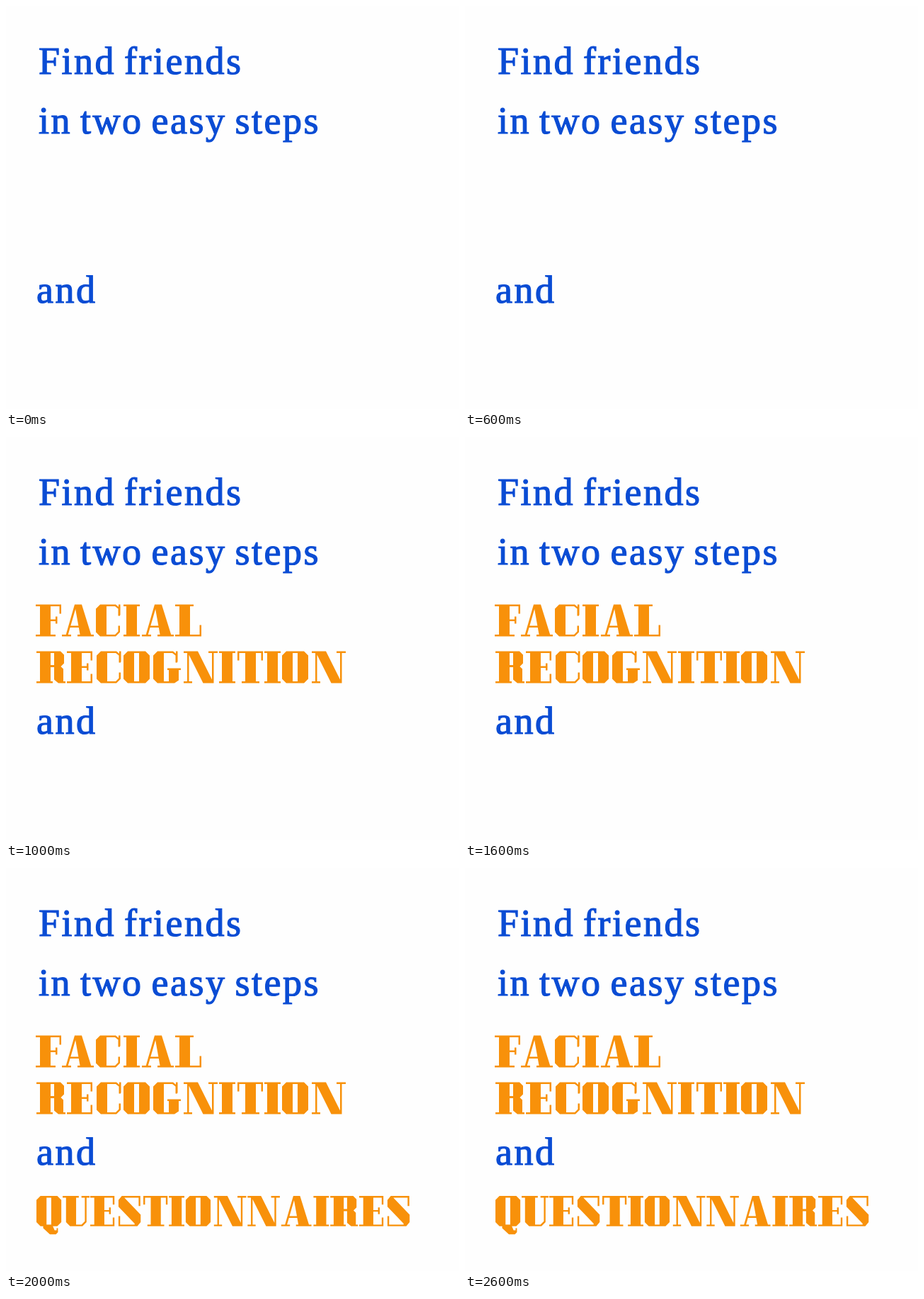
An HTML page for the animation above (3000 ms loop, 640 by 569 pixels).

```html
<!DOCTYPE html>
<html lang="en">
<head>
<meta charset="utf-8">
<title>Find friends in two easy steps</title>
<style>
  html, body { margin: 0; height: 100%; overflow: hidden; background: #fefefe; }
  svg { display: block; width: 640px; height: 569px; }
  text {
    font: 54px "Liberation Serif", serif;
    letter-spacing: 2.5px; word-spacing: -4px;
    fill: #0a4cd4; stroke: #0a4cd4; stroke-width: 1.2px;
  }
  g { fill: #f8910a; }
</style>
</head>
<body>
<svg viewBox="0 0 640 569">
  <text x="46" y="96">Find friends</text>
  <text x="46" y="180">in two easy steps</text>
  <text x="43" y="419">and</text>
  <g id="first"></g>
  <g id="second"></g>
</svg>
<script>
const LOOP = 3000, STEP = 1000;
const first = document.getElementById("first");
const second = document.getElementById("second");

// Slab lettering, 45 units high, built from heavy stems and hairlines.
const rect = (x, y, w, h) => `M${x} ${y}h${w}v${h}h${-w}z`;
const stem = x => rect(x, 0, 15, 45);
const bar = (x, y, w) => rect(x, y, w, 2.5);
const tick = (x, y, h) => rect(x, y, 2.5, h);
const head = (w, x = 0) => bar(x, 0, w);
const foot = (w, x = 0) => bar(x, 42.5, w);

const armed = stem(6) + head(36) + tick(33.5, 0, 13) + bar(21, 21, 8) + tick(28, 17, 10);
const ring = "M6 0h25l6 6v33l-6 6h-25l-6-6v-33zM15 2.5v40h7v-40z";
const curve = "M7 0h9v45h-9l-6-6v-33z" + "M16 0h13l6 5v11h-2.5v-10l-4.5-3.5h-12z" + tick(33, 0, 15);

// Each letter: [advance, outline]
const letters = {
  A: [48, "M19 0h3L9 45h-3zM19 0h10l14 45h-16z" + bar(12, 30, 14) + foot(13, 1) + foot(23, 23)],
  C: [39, curve + "M16 45h13l6-6v-9h-2.5v8l-4.5 4.5h-12z"],
  E: [41, armed + foot(36) + tick(33.5, 32, 13)],
  F: [36, armed + foot(28)],
  G: [43, curve + bar(21, 24, 19) + "M23 24h14v17l-6 4H16v-2.5h7z"],
  I: [26, stem(5) + head(23, 1) + foot(23, 1)],
  L: [38, stem(6) + head(26) + foot(37) + tick(34.5, 29, 16)],
  N: [50, "M6 0h15l22.5 45h-15z" + tick(6, 0, 45) + tick(41, 0, 45) + head(18, 1) + head(13, 36) + foot(12, 1)],
  O: [41, ring],
  Q: [39, ring + "M10 44h14l3 7h3v-3h2v6l-3 3h-9l-10-9z"],
  R: [43, stem(5) + head(20) + foot(23) +
    "M20 0h14l5 5v12l-5 5h-14v-2.5h5v-17h-5zM20 20h13l5 5v17.5h3v2.5h-10l-6-5v-17.5h-5z"],
  S: [37, "M1 6l5-6h4v3l24 25v11l-5 6h-4v-4L1 16z" + head(24, 9) + foot(24, 2) + tick(31, 0, 15) + tick(1, 30, 15)],
  T: [38, stem(12) + head(36, 1) + tick(1, 0, 13) + tick(34.5, 0, 13) + foot(25, 7)],
  U: [41, "M5 0h15v45h-9l-6-6z" + head(24) + head(12, 28) + "M20 42.5h8l5-5V0h2.5v39l-6 6h-9.5z"],
};

function letterLine(group, word, x, y, scale = 1) {
  let pen = 0, paths = "";
  for (const ch of word) {
    const [advance, outline] = letters[ch];
    paths += `<path transform="translate(${pen})" d="${outline}"/>`;
    pen += advance;
  }
  group.innerHTML +=
    `<g role="img" aria-label="${word}" transform="translate(${x} ${y}) scale(${scale})">${paths}</g>`;
}

letterLine(first, "FACIAL", 42, 236.5);
letterLine(first, "RECOGNITION", 43, 302.5);
letterLine(second, "QUESTIONNAIRES", 43, 463, 0.95);

function draw() {
  const t = performance.now() % LOOP;
  first.style.display = t >= STEP ? "" : "none";
  second.style.display = t >= 2 * STEP ? "" : "none";
  requestAnimationFrame(draw);
}
draw();
</script>
</body>
</html>
```
